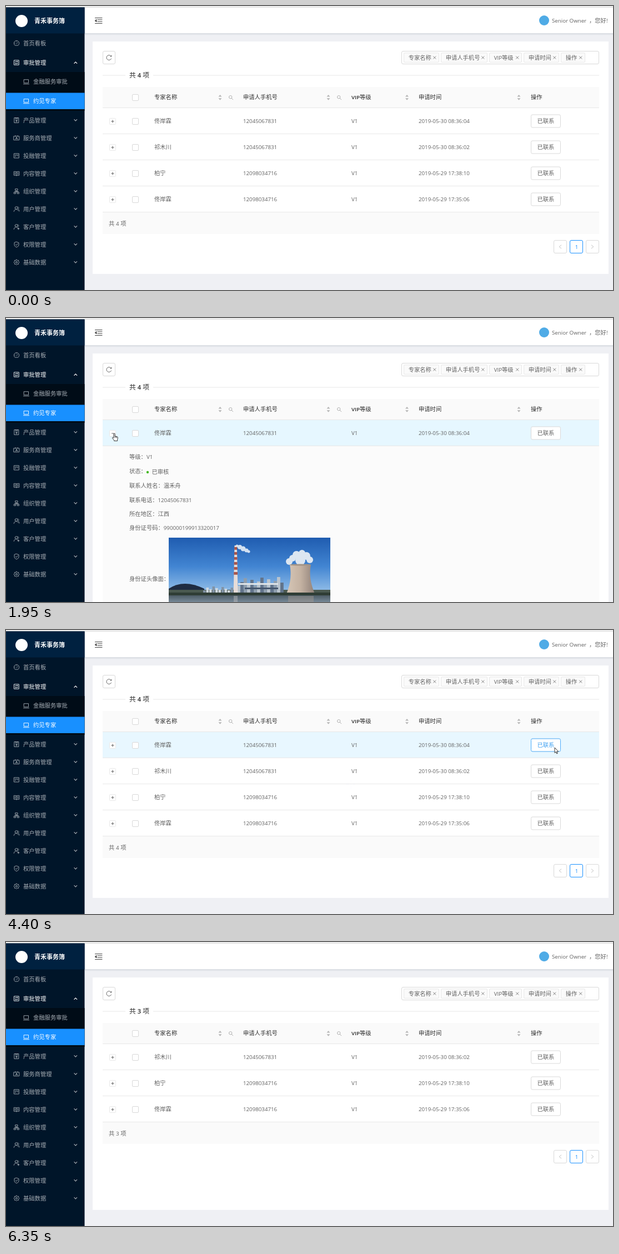
Animation of 1093 by 512 pixels, one loop 6420 ms. Source, as an HTML page:

```html
<!DOCTYPE html>
<html lang="zh">
<head>
<meta charset="utf-8">
<style>
html, body { margin: 0; width: 100%; height: 100%; overflow: hidden; background: #f0f2f5; }
svg { display: block; width: 100%; height: 100%; }
text { font: 10.3px "Open Sans", "Noto Sans CJK SC", "Noto Sans CJK", sans-serif; fill: #626262; white-space: pre; }
.n { font-size: .945em; }
.dark { fill: #2f2f2f; }
.dark .n { font-weight: 600; }
.total { font-size: 11.75px; fill: #262626; }
.total .n { font-weight: 600; }
.nav { fill: #a6adb4; }
.on { fill: #fff; }
.brand { font-size: 11px; font-weight: 700; fill: #fff; }
.blue { fill: #1890ff; }
.hot { fill: #40a9ff; }
.ico { fill: none; stroke-width: .9; stroke-linejoin: round; stroke-linecap: round; }
</style>
</head>
<body>
<svg id="stage" viewBox="0 0 1093 512" xmlns="http://www.w3.org/2000/svg"></svg>
<script>
const LOOP = 6420, ROW = 47, TOP = 184, SIDE = 141.5;
const stage = document.getElementById('stage');

const rect = (x, y, w, h, fill, more = '') =>
  `<rect x="${x}" y="${y}" width="${w}" height="${h}" fill="${fill}" ${more}/>`;
const box = (x, y, w, h, stroke, r = 2.5, fill = '#fff') =>
  rect(x + .5, y + .5, w - 1, h - 1, fill, `rx="${r}" stroke="${stroke}"`);
const path = (d, fill, more = '') => `<path d="${d}" fill="${fill}" ${more}/>`;
const icon = (x, y, d, color, more = '') =>
  `<path class="ico" transform="translate(${x} ${y})" d="${d}" stroke="${color}" ${more}/>`;
const circle = (x, y, r, fill, more = '') =>
  `<circle cx="${x}" cy="${y}" r="${r}" fill="${fill}" ${more}/>`;
const line = (x, y, w, color = '#e8e8e8') => rect(x, y, w, 1, color);
// x is the left edge, y the middle of the line; Latin runs are set a little smaller
const text = (x, y, s, cls = '', more = '') =>
  `<text x="${x}" y="${y + 3.8}" class="${cls}" ${more}>` +
  s.replace(/[!-~]+( [!-~]+)*/g, m => `<tspan class="n">${m}</tspan>`) + '</text>';
const group = (id, body, more = '') => `<g id="${id}" ${more}>${body}</g>`;

// ---- sidebar and top bar ----
const laptop = 'M-4 -3.8H4V2.2H-4ZM-5 4.2H5';
const person = 'M-2.8 -2A2.3 2.3 0 1 1 1.8 -2A2.3 2.3 0 1 1 -2.8 -2M-4.8 4.5C-4.6 -.2 2 -.8 3 3';
const menu = [
  ['首页看板', 67, 'M-3 3.8A4.7 4.7 0 1 1 3 3.8ZM0 1L2 -1.4M-3 0H-2.6M0 -3V-2.7'],
  ['审批管理', 102, 'M-4.2 -4.2H4.2V4.2H-4.2ZM-2.2 -.8V-1.6H2.2M1.2 -2.6L2.2 -1.6M2.2 .8V1.7H-2.2M-1.2 2.7L-2.2 1.7'],
  ['产品管理', 206, 'M-3.8 -4.5H3.8V4.5H-3.8ZM-1.8 -4.5V-3H1.8V-4.5M-1.7 -1.5L0 .6L1.7 -1.5M0 .6V3M-1.6 1.2H1.6'],
  ['服务商管理', 238, 'M-4.8 -3.2H4.8V3.6H-4.8ZM-2 -4.5V-3.2M2 -4.5V-3.2M-1.6 2L0 -1.6L1.6 2M-1 .8H1'],
  ['投融管理', 270, 'M-4.3 -4H4.3V4H-4.3ZM-2.2 -2V1.8M0 -2V-.2M2.2 -2V.6'],
  ['内容管理', 302, 'M0 -2.8V4M0 -2.8C-1 -3.6 -3 -3.7 -4.8 -3.6V3.2H-1L0 4L1 3.2H4.8V-3.6C3 -3.7 1 -3.6 0 -2.8M-3.2 -1.2H-1.6M-3.2 .8H-1.6M1.6 -1.2H3.2M1.6 .8H3.2'],
  ['组织管理', 334, 'M-2 -4.3H2V-1.2H-2ZM0 -1.2V1.8M-3 1.8V.4H3V1.8M-4.4 1.8H-1.6V4.3H-4.4ZM1.6 1.8H4.4V4.3H1.6Z'],
  ['用户管理', 366, person + 'M2 -4C4.8 -3.4 4.2 -.6 2.6 0C4 .6 4.8 2 4.9 4'],
  ['客户管理', 398, person + 'M2 -4C4.6 -3.4 4.2 -.8 2.6 0M1.8 3.6H5M3.4 2V5'],
  ['权限管理', 430, 'M0 -4.7L4 -3.2V.6C4 2.8 2 4 0 4.9C-2 4 -4 2.8 -4 .6V-3.2ZM-1.8 0L-.4 1.5L2 -1.4'],
  ['基础数据', 462, 'M0 -4.9L1.4 -3.4L3.5 -3.5L3.7 -1.3L5 0L3.7 1.3L3.5 3.5L1.4 3.4L0 4.9L-1.4 3.4L-3.5 3.5L-3.7 1.3L-5 0L-3.7 -1.3L-3.5 -3.5L-1.4 -3.4ZM-1.6 0A1.6 1.6 0 1 1 1.6 0A1.6 1.6 0 1 1 -1.6 0']
];
const grey = '#a6adb4';

function frame() {
  let s = rect(0, 0, 1093, 512, '#eff0f4') + rect(0, 0, 1093, 50, '#fff') +
    rect(0, 1, 1093, 1.6, '#dcdcdc') +
    rect(SIDE, 49, 1093 - SIDE, 4, 'url(#shade)') +
    rect(0, 2.5, SIDE, 510, '#001529') + rect(0, 2.5, SIDE, 47, '#002140') +
    circle(28, 27, 11, '#fff') + text(51, 27.5, '青禾事务簿', 'brand') +
    rect(0, 119, SIDE, 70, '#000c17') + rect(0, 156.5, SIDE, 29.5, '#1890ff');
  menu.forEach(([name, y, d], i) => {
    const open = i === 1, c = open ? '#fff' : grey;
    s += icon(19, y, d, c) + text(31, y, name, open ? 'on' : 'nav', open ? 'font-weight="500"' : '');
    if (i) s += icon(125.3, y, open ? 'M-2.4 1.3L0 -1.1L2.4 1.3' : 'M-2.4 -1.3L0 1.1L2.4 -1.3', c, 'style="stroke-width:1.2"');
  });
  s += icon(36.5, 136.5, laptop, grey) + text(49, 136.5, '金融服务审批', 'nav') +
    icon(36.5, 171.5, laptop, '#fff') + text(49, 171.5, '约见专家', 'on');
  s += icon(166.5, 26.5, 'M-6 -5H6.5M-1.5 -1.7H6.5M-1.5 1.7H6.5M-6 5H6.5M-3.6 -2L-6 0L-3.6 2Z', '#404040', 'style="stroke-width:1.1"') +
    circle(969, 26, 9, '#4fabe6') + text(983, 26.5, 'Senior Owner') + text(1050, 26.5, '，您好!');
  return s;
}

// ---- card ----
const tags = [['专家名称', 716, 64], ['申请人手机号', 783, 84], ['VIP等级', 870, 59], ['申请时间', 932, 64], ['操作', 999, 44]];

function toolbar() {
  let s = box(174, 81, 23, 24, '#d9d9d9') +
    group('reload', icon(0, 0, 'M4.1 2A4.5 4.5 0 1 1 3.9 -2.3M4.4 -4V-2H2.4', '#555')) +
    box(712, 81, 356, 24, '#d9d9d9');
  for (const [name, x, w] of tags)
    s += box(x, 84, w, 18, '#e8e8e8', 1.5, '#fafafa') + text(x + 8.7, 93.3, name) +
      icon(x + w - 8.3, 93, 'M-2.2 -2.2L2.2 2.2M2.2 -2.2L-2.2 2.2', '#777');
  return s + line(174, 124.5, 41) + line(265, 124.5, 803) +
    group('total4', text(222, 125.3, '共 4 项', 'total')) +
    group('total3', text(222, 125.3, '共 3 项', 'total'));
}

const check = y => box(227, y - 6, 12, 12, '#d9d9d9', 1.5);

function head() {
  let s = rect(174, 146, 894, 38, '#fafafa') + line(174, 183, 894) + check(165);
  [['专家名称', 267], ['申请人手机号', 427], ['VIP等级', 622], ['申请时间', 743], ['操作', 945]]
    .forEach(([name, x]) => s += text(x, 164.5, name, 'dark'));
  for (const x of [385.5, 580.5, 722, 923.5])
    s += path(`M${x - 3} 163.6h6l-3 -3.6zM${x - 3} 166.2h6l-3 3.6z`, '#b5b5b5');
  for (const x of [405, 600])
    s += icon(x, 165, 'M-3.5 -.8A2.7 2.7 0 1 1 1.9 -.8A2.7 2.7 0 1 1 -3.5 -.8M1.2 1.3L3.8 3.8', '#aaa');
  return s;
}

const people = [
  ['佟岸霖', '12045067831', '2019-05-30 08:36:04'],
  ['祁木川', '12045067831', '2019-05-30 08:36:02'],
  ['柏宁', '12098034716', '2019-05-29 17:38:10'],
  ['佟岸霖', '12098034716', '2019-05-29 17:35:06']
];

const button = (y, color, cls) => box(945, y - 12, 54, 24, color) + text(956.5, y, '已联系', cls);

function row([name, phone, time], i, open) {
  const y = TOP + ROW * i + 23.5;
  return line(174, TOP + ROW * (i + 1) - 1, 894) +
    box(186, y - 5.5, 12, 12, '#e8e8e8', 1) +
    icon(192, y + .5, open ? 'M-1.5 0H1.5' : 'M-2.2 0H2.2M0 -2.2V2.2', '#555') +
    check(y + .5) + text(267, y, name) + text(427, y, phone) + text(622, y, 'V1') +
    text(743, y, time) + button(y, '#d9d9d9', '');
}

function list(rows) {
  const end = TOP + ROW * rows.length, y = end + 50;
  return rows.map((p, i) => row(p, i)).join('') +
    rect(174, end, 894, 39, '#fafafa') + text(185, end + 20, `共 ${rows.length} 项`) +
    box(986, y, 24, 24, '#d9d9d9') + icon(998, y + 12, 'M1.8 -3L-1.8 0L1.8 3', '#bbb') +
    box(1015, y, 24, 24, '#1890ff') + text(1024.7, y + 12, '1', 'blue') +
    box(1044, y, 24, 24, '#d9d9d9') + icon(1056, y + 12, 'M-1.8 -3L1.8 0L-1.8 3', '#bbb');
}

const puffs = (list, color) => list.map(([x, y, r]) => circle(x, y, r, color)).join('');

function photo() {
  let s = rect(293, 396, 291, 116, 'url(#sky)');
  s += puffs([[416, 411, 2.5], [421, 413, 4], [427, 416, 4.5], [433, 419, 3.5], [437, 421, 2.5]], '#d3e1f1') +
    puffs([[510, 439, 6], [516, 433, 6], [523, 427, 7], [533, 424, 6], [541, 429, 7], [547, 436, 6], [530, 437, 9]], '#dce6f1');
  s += path('M293 488Q320 470 357 488V497H293Z', '#1f2c42') +
    rect(293, 490, 291, 10, '#4a5950');
  // low buildings and the plant, heights from a simple rule
  for (let i = 0; i < 11; i++) {
    const h = 6 + (i * 5) % 8;
    s += rect(355 + i * 5.5, 497 - h, 4.5, h, i % 3 ? '#cfd8e0' : '#8193a6');
  }
  for (let i = 0; i < 14; i++) {
    const h = 14 + (i * 7) % 17;
    s += rect(416 + i * 6, 497 - h, 5.8, h, ['#b9c4ce', '#62748b', '#8d9dad'][i % 3]);
  }
  s += rect(418, 478, 72, 3, '#dfe4e8') + rect(430, 486, 60, 3, '#46586f');
  s += path('M411.5 410H415.7L417.5 496H409.7Z', '#e6dcd8');
  for (let i = 0; i < 6; i++) s += rect(411.2 - i * .2, 413 + i * 9, 4.8 + i * .4, 4.8, '#a9564c');
  s += path('M511 445C515 466 511 482 505 497H556C550 482 545 466 549 445Z', 'url(#tower)') +
    `<ellipse cx="530" cy="445" rx="19" ry="1.6" fill="#a39486"/>`;
  return s + rect(293, 495, 291, 5, '#2f3d35') + rect(293, 500, 291, 12, 'url(#water)') +
    rect(508, 501, 46, 11, '#a59a90', 'opacity=".45"') + rect(410, 501, 7, 11, '#c9c4c2', 'opacity=".4"');
}

function detail() {
  let s = rect(156, 480, 929, 32, '#fff') + rect(174, 231, 894, 281, '#fbfbfb');
  [['等级：V1', 250.5], ['状态：', 276.5], ['联系人姓名：温禾舟', 302.5], ['联系电话：12045067831', 328],
    ['所在地区：江西', 353], ['身份证号码：990000199913320017', 378.5], ['身份证头像面：', 470]]
    .forEach(([label, y]) => s += text(222, y, label));
  return s + circle(255, 278, 2.2, '#45b81f') + text(262.5, 277, '已审核') + photo();
}

const stops = (id, list, more) => `<linearGradient id="${id}" ${more}>` +
  list.map(([o, c]) => `<stop offset="${o}" stop-color="${c}"/>`).join('') + '</linearGradient>';
const down = 'x1="0" y1="0" x2="0" y2="1"';

stage.innerHTML = '<defs>' +
  stops('shade', [[0, '#d5d8de'], [1, '#eff0f4']], down) +
  stops('sky', [[0, '#1f5cb0'], [.45, '#4285d2'], [.82, '#8dbae6'], [1, '#a3c6e6']], down) +
  stops('water', [[0, '#4d5c66'], [1, '#7688978']].map(([o, c]) => [o, c.slice(0, 7)]), down) +
  stops('tower', [[0, '#d6c6b6'], [.5, '#c4b2a2'], [1, '#8f8078']], '') + '</defs>' +
  frame() + rect(156, 64, 929, 419, '#fff') + toolbar() +
  group('table', head() +
    group('open', detail()) +
    [0, 1, 2, 3].map(i => rect(174, TOP + ROW * i, 894, ROW - 1, '#e6f7ff', `id="row${i}"`)).join('') +
    group('list4', list(people)) + group('list3', list(people.slice(1))) +
    group('openTop', row(people[0], 0, true)) +
    group('hot', button(TOP + 23.5, '#40a9ff', 'hot'))) +
  group('spin', [0, 1, 2, 3].map(i => circle(0, -6.1, 2.6, '#1890ff', `id="dot${i}" transform="rotate(${i * 90 - 45})"`)).join('')) +
  circle(0, 0, 9, '#fff23a', 'id="click" opacity=".85"') +
  group('arrow', path('M0 0V9.6L2.2 7.6L3.7 11L5.2 10.4L3.7 7.1H6.7Z', '#fff', 'stroke="#222" stroke-width=".9"')) +
  group('hand', path('M-1.1 .9C-1.1 -.4 1.1 -.4 1.1 .9V5L5 6C6.2 6.3 6.6 7 6.4 8.2L5.6 11.2V13.6H-.4V12.2L-3.4 8.8C-4 7.6 -2.8 6.9 -2 7.6L-1.1 8.5Z', '#fff', 'stroke="#222" stroke-width=".9"') +
    icon(0, 0, 'M1.1 5V7.5M2.9 5.7V7.8M4.6 6.2V8', '#222', 'style="stroke-width:.7"'));

const el = {};
stage.querySelectorAll('[id]').forEach(e => el[e.id] = e);

// ---- motion ----
const clamp = v => Math.min(1, Math.max(0, v));
const show = (id, on) => el[id].setAttribute('display', on ? 'inline' : 'none');
const set = (id, name, v) => el[id].setAttribute(name, v);
const within = (t, a, b) => t >= a && t < b;

// start, end, from x, y, to x, y, ease-out power
const moves = [
  [690, 1300, 994, 490, 212, 210, 2.44],
  [1380, 1700, 212, 210, 195, 208, 2],
  [3320, 3860, 195, 208, 1003, 213, 2],
  [3860, 4060, 1003, 213, 988, 212, 2]
];

function pointer(t) {
  if (!within(t, 690, 6350)) return null;
  if (t >= 5500) {
    const u = clamp((t - 5500) / 740), v = 1 - u;
    const bend = (a, b, c) => v * v * a + 2 * u * v * b + u * u * c;
    return [bend(988, -493, 1078), bend(212, 330, 511)];
  }
  const [a, b, x0, y0, x1, y1, p] = moves.filter(m => t >= m[0]).pop();
  const k = 1 - Math.pow(1 - clamp((t - a) / (b - a)), p);
  return [x0 + (x1 - x0) * k, y0 + (y1 - y0) * k];
}

const busy = t => within(t, 4400, 5000);
const isOpen = t => within(t, 1950, 3250);

function hoverRow(t) {
  const p = pointer(t);
  if (!p || busy(t) || p[0] < 174 || p[0] > 1068) return -1;
  const i = Math.floor((p[1] - TOP) / ROW), n = isOpen(t) ? 1 : t >= 4560 ? 3 : 4;
  return i < n ? i : -1;
}

function onButton(t) {
  const p = pointer(t);
  return !!p && !busy(t) && within(p[0], 945, 999) && within(p[1], 195, 219);
}

function onExpand(t) {
  const p = pointer(t);
  return !!p && within(p[0], 186, 199) && within(p[1], 201, 215);
}

// share of the last 120 ms in which the test held
function recent(t, test) {
  let sum = 0;
  for (let i = 0; i < 12; i++) sum += test(t - i * 10) ? 1 : 0;
  return sum / 12;
}

function draw(t) {
  const open = isOpen(t), three = t >= 4560;
  show('open', open);
  show('openTop', open);
  show('list4', !open && !three);
  show('list3', three);
  show('total4', !three);
  show('total3', three);
  for (let i = 0; i < 4; i++) set('row' + i, 'opacity', recent(t, s => hoverRow(s) === i));
  set('hot', 'opacity', recent(t, onButton));

  const load = clamp((t - 4400) / 200) * (1 - clamp((t - 4950) / 150));
  set('table', 'opacity', 1 - .7 * load);
  show('spin', load > 0);
  set('spin', 'opacity', Math.min(1, load * 2));
  const age = (t - 4400) / 1000;
  set('spin', 'transform', `translate(621 278) rotate(${45 + 300 * age})`);
  for (let i = 0; i < 4; i++) {
    const phase = Math.max(0, age - .4 * i) % 2;
    set('dot' + i, 'opacity', .3 + .7 * (1 - Math.abs(1 - phase)));
  }
  const turn = within(t, 4400, 4560) ? (t - 4400) * .36 : 0;
  set('reload', 'transform', `translate(185.5 93) rotate(${turn})`);

  const p = pointer(t), hand = onButton(t) || onExpand(t);
  show('arrow', p && !hand);
  show('hand', p && hand);
  show('click', within(t, 3190, 3320) || within(t, 4220, 4400));
  if (p) for (const id of ['arrow', 'hand', 'click'])
    set(id, 'transform', `translate(${p[0]} ${p[1] + (id === 'click' ? 1 : 0)})`);
}

const start = performance.now();
function tick(now) {
  draw(Math.max(0, now - start) % LOOP);
  requestAnimationFrame(tick);
}
draw(0);
requestAnimationFrame(tick);
</script>
</body>
</html>
```
